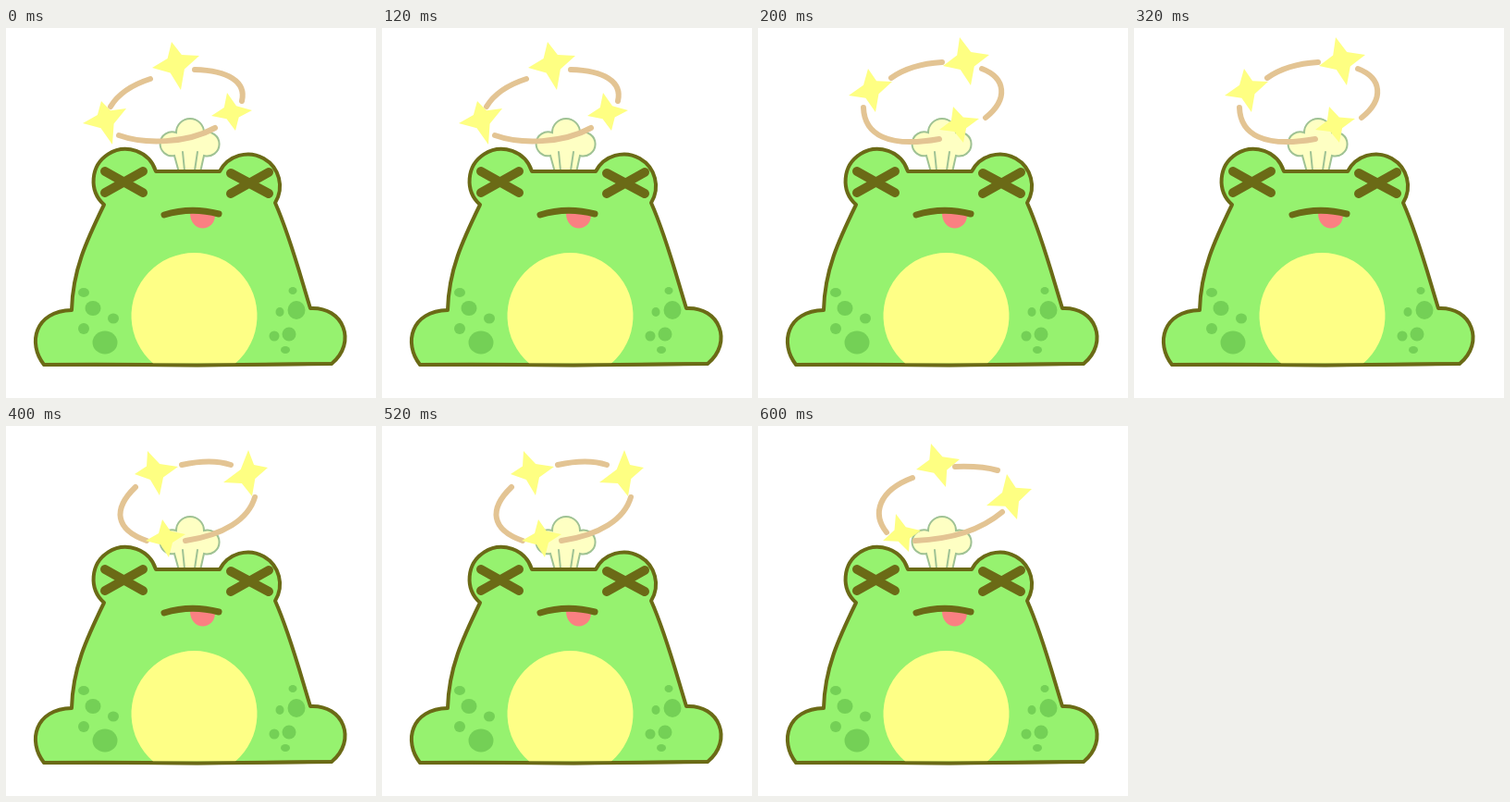
An HTML page that plays this animation: 400 px wide and 400 px high, repeating every 0.8 s.

```html
<!DOCTYPE html>
<html lang="en">
<head>
<meta charset="utf-8">
<title>Dizzy frog</title>
<style>
html, body { margin: 0; width: 100%; height: 100%; overflow: hidden; background: #fff; }
svg { display: block; width: 100%; height: 100%; }
.line { fill: none; stroke: #6b6a16; stroke-linecap: round; stroke-linejoin: round; }
</style>
</head>
<body>
<svg viewBox="0 0 400 400">
  <g fill="#feffc3" stroke="#9fc294" stroke-width="2" stroke-linecap="round">
    <path d="M187 156L182 138A13 13 0 1 1 184 113A15 15 0 0 1 214 113A13 13 0 1 1 214 138L210 156"/>
    <path d="M191 134L193 154M207 134L204 154"/>
  </g>
  <path id="body" class="line" style="fill:#96f26f" stroke-width="4" d="M41 364C23 341 31 306 71 305C72 262 87 230 106 191A34.5 34.5 0 1 1 162 155H231A34.5 34.5 0 1 1 291 189C307 225 317 264 329 303C365 301 380 340 352 363Q280 364 207 364.500Q125 363.500 41 364Z"/>
  <path fill="#feff86" d="M159 362.500A68 68 0 1 1 248 362.500Z"/>
  <path class="line" stroke-width="3.500" d="M41 364L207 364.500L352 363"/>
  <g id="spots" fill="#74d056"></g>
  <path class="line" stroke-width="10" d="M107 155L148 178M148 155L107 178M243 157L284 179M284 156L243 179"/>
  <path fill="#fa8082" d="M199 200C199 222 226 221 226 202Z"/>
  <path class="line" stroke-width="7" d="M171 202Q200 193 230 201"/>
  <path id="trail" fill="none" stroke="#e3c493" stroke-width="6" stroke-linecap="round"/>
  <path id="stars" fill="#feff82"/>
</svg>
<script>
const $ = id => document.getElementById(id);

// x, y, rx, ry
const spots = [[84,286,6,5], [94,303,8.5,8], [116,314,6,5.5], [84,325,6,6], [107,340,13.5,12.5],
  [310,284,4.5,4], [296,307,4.5,5], [314,305,9.5,10], [290,333,5.5,5.5], [306,331,7.5,7.5], [302,348,5,4]];
$("spots").innerHTML = spots.map(([x, y, rx, ry]) =>
  `<ellipse cx="${x}" cy="${y}" rx="${rx}" ry="${ry}"/>`).join("");

// Each pose: trail path and the four tips of every star
const poses = [
  { trail: "M113 85Q125 65 156 55M204 45C240 46 260 58 255 79M122 116C150 126 195 125 226 108",
    stars: [[179,15, 209,30, 189,67, 158,43], [103,79, 130,87, 115,126, 83,103], [239,70, 266,89, 248,111, 222,95]] },
  { trail: "M144 54Q165 39 199 37M242 44C268 54 271 77 246 97M114 86C115 115 140 130 196 120",
    stars: [[218,10, 250,29, 230,62, 200,41], [119,44, 145,58, 127,91, 98,73], [211,85, 239,98, 222,124, 196,110]] },
  { trail: "M190 42Q222 35 243 42M269 77C262 101 235 118 194 124M140 66C115 90 118 112 152 124",
    stars: [[153,27, 186,44, 166,75, 139,52], [262,26, 283,45, 266,76, 235,61], [169,101, 194,117, 176,142, 151,124]] },
  { trail: "M213 44Q242 43 259 48M264 93C240 113 210 122 170 124M167 56C130 70 123 95 139 115",
    stars: [[187,19, 218,36, 203,66, 171,47], [269,52, 296,68, 280,101, 247,86], [149,95, 176,113, 163,136, 135,124]] }
];

function starPath(p) {
  const cx = (p[0] + p[2] + p[4] + p[6]) / 4, cy = (p[1] + p[3] + p[5] + p[7]) / 4;
  const pts = [];
  for (let i = 0; i < 8; i += 2) {
    const x = p[i], y = p[i + 1], nx = p[(i + 2) % 8], ny = p[(i + 3) % 8];
    const inner = [cx + ((x + nx) / 2 - cx) * 0.6, cy + ((y + ny) / 2 - cy) * 0.6];
    pts.push([x, y], inner);
  }
  return "M" + pts.join("L") + "Z";
}

function draw(now) {
  const pose = poses[Math.floor(now % 800 / 200)];
  $("trail").setAttribute("d", pose.trail);
  $("stars").setAttribute("d", pose.stars.map(starPath).join(""));
}

const start = performance.now();
function tick() {
  draw(performance.now() - start);
  requestAnimationFrame(tick);
}
tick();
</script>
</body>
</html>
```
